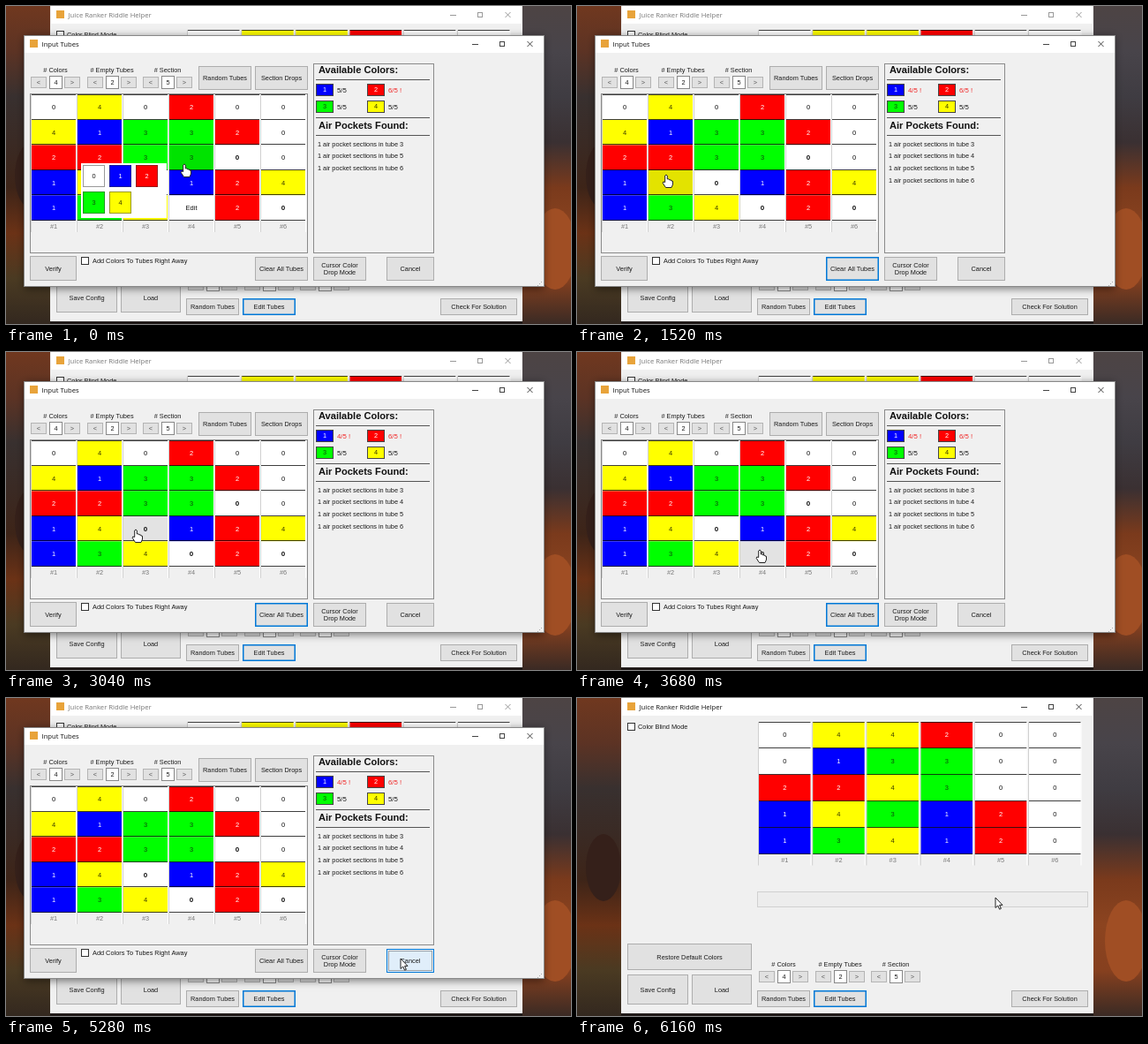
Write an HTML page with a canvas that moves like this. It is 640x360 px and loops after 6240 ms.

```html
<!DOCTYPE html>
<html lang="en">
<head>
<meta charset="utf-8">
<title>Input Tubes</title>
<style>
html, body { margin: 0; width: 100%; height: 100%; overflow: hidden; background: #201a18; }
canvas { display: block; width: 640px; height: 360px; }
</style>
</head>
<body>
<canvas id="stage" width="640" height="360"></canvas>
<script>
const ctx = document.getElementById('stage').getContext('2d');
const LOOP = 6240, STEP = 80;
const POPUP_CLOSES = 640, EDIT_APPLIED = 720, CANCEL_PRESSED = 5120, DIALOG_CLOSES = 5440;
const UI = '"Liberation Sans", Arial, sans-serif';
const TITLE = '7.7px "Open Sans", "Noto Sans", sans-serif';
const FILL = ['#fff', '#00f', '#f00', '#0f0', '#ff0'];
const INK = ['#111', '#fff', '#fff', '#0b4a0b', '#330'];

// One word per tube, colours from top to bottom
const mainTubes = '00211 41243 43434 23311 00022 00000'.split(' ');
const inputTubes = '04211 41243 03304 23310 02022 00040'.split(' ');
const mainGrid = { x: 206, y: 27, dx: 61.2, w: 58.5, dy: 29.9 };
const inputGrid = { x: 29, y: 100.4, dx: 52, w: 50, dy: 28.5 };

// Pointer stops: time, x, y
const stops = [
  [0, 202, 179], [640, 100, 188], [1840, 101, 192], [2000, 121, 196], [3040, 147, 201],
  [4080, 237, 236], [4400, 511, 277], [4960, 447, 295], [DIALOG_CLOSES, 447, 295], [6160, 474, 226]
];

const ease = k => k * k * (3 - 2 * k);
const inside = ([px, py], x, y, w, h) => px >= x && px < x + w && py >= y && py < y + h;

function pointerAt(t) {
  const i = stops.findIndex(s => s[0] > t);
  if (i < 0) return stops.at(-1).slice(1);
  const [t0, x0, y0] = stops[i - 1], [t1, x1, y1] = stops[i];
  const k = ease((t - t0) / (t1 - t0));
  return [x0 + (x1 - x0) * k, y0 + (y1 - y0) * k];
}

function rect(x, y, w, h, color) {
  ctx.fillStyle = color;
  ctx.fillRect(x, y, w, h);
}

function frame(x, y, w, h, color, width = 1) {
  ctx.strokeStyle = color;
  ctx.lineWidth = width;
  ctx.strokeRect(x + width / 2, y + width / 2, w - width, h - width);
}

function dotted(x, y, w, h, color) {
  ctx.setLineDash([1, 1]);
  frame(x, y, w, h, color);
  ctx.setLineDash([]);
}

function text(str, x, y, { color = '#1a1a1a', align = 'left', font = '7.35px ' + UI } = {}) {
  ctx.font = font;
  ctx.fillStyle = color;
  ctx.textAlign = align;
  ctx.textBaseline = 'middle';
  ctx.fillText(str, x, y);
}

function button(label, x, y, w, h, state = '') {
  rect(x, y, w, h, state === 'hot' ? '#e0eefa' : '#e1e1e1');
  frame(x, y, w, h, state ? '#0078d7' : '#adadad', state === 'focus' ? 1.5 : 1);
  const lines = label.split('\n');
  lines.forEach((line, i) =>
    text(line, x + w / 2, y + h / 2 + 0.5 + (i - (lines.length - 1) / 2) * 8.5, { align: 'center' }));
}

function spinner(label, value, x, y) {
  text(label, x + 28, y - 7, { align: 'center' });
  for (const [sign, sx] of [['<', x], ['>', x + 38]]) {
    rect(sx, y, 18, 13, '#e1e1e1');
    frame(sx, y, 18, 13, '#b4b4b4');
    text(sign, sx + 9, y + 7, { align: 'center', color: '#555' });
  }
  rect(x + 21, y - 1, 15, 15, '#fff');
  frame(x + 21, y - 1, 15, 15, '#888');
  text(value, x + 28.5, y + 7, { align: 'center' });
}

function spinners(x, y) {
  ['# Colors', '# Empty Tubes', '# Section'].forEach((label, i) =>
    spinner(label, '425'[i], x + Math.round(i * 63.6), y));
}

function checkbox(label, x, y, gap) {
  rect(x, y, 9, 9, '#fff');
  frame(x, y, 9, 9, '#333');
  text(label, x + gap, y + 5);
}

function titleBar(label, x, y, w, active) {
  rect(x, y, w, 20, '#fff');
  rect(x + 6, y + 5, 9, 9, '#e8a33a');
  text(label, x + 19.5, y + 10.5, { font: TITLE, color: active ? '#111' : '#777' });
  const color = active ? '#444' : '#999', cy = y + 10, right = x + w;
  rect(right - 81, cy, 7, 1, color);
  frame(right - 50, cy - 3, 6, 6, color);
  ctx.beginPath();
  for (const d of [-3, 3]) {
    ctx.moveTo(right - 15.5 - d, cy - 3);
    ctx.lineTo(right - 15.5 + d, cy + 3);
  }
  ctx.stroke();
}

function swatch(d, x, y, w, h, { hot, label = d, font } = {}) {
  rect(x, y, w, h, FILL[d]);
  if (hot) rect(x, y, w, h, 'rgba(0,0,0,.11)');
  text(label, x + w / 2, y + h / 2 + 0.4, { align: 'center', color: INK[d], font });
}

function drawTubes(tubes, g, pointer, editing) {
  const height = 5 * g.dy;
  tubes.forEach((tube, c) => {
    const x = g.x + c * g.dx;
    rect(x - 1, g.y, 1, height + 13, '#d0d0d0');
    rect(x + g.w, g.y, 1, height + 13, '#fff');
    [...tube].forEach((d, r) => {
      const y = g.y + r * g.dy;
      const edit = editing && c === 3 && r === 4;
      const pocket = pointer && !edit && d === '0' && /[1-9]/.test(tube.slice(0, r));
      swatch(d, x, y, g.w, g.dy, {
        hot: pointer && inside(pointer, x, y, g.w, g.dy),
        label: edit ? 'Edit' : d,
        font: (pocket ? 'bold 8px ' : '7.5px ') + UI
      });
    });
    for (let r = 0; r <= 5; r++)
      rect(x, Math.round(g.y + r * g.dy) - (r ? 1 : 0), g.w, 1, 'rgba(0,0,0,.75)');
    text('#' + (c + 1), x + g.w / 2, g.y + height + 7.5, { align: 'center', color: '#777' });
  });
}

function strip(x, w, ...colors) {
  const shade = ctx.createLinearGradient(0, 0, 0, 360);
  colors.forEach((color, i) => shade.addColorStop(i / (colors.length - 1), color));
  rect(x, 0, w, 360, shade);
}

function blob(x, y, rx, ry, color) {
  ctx.beginPath();
  ctx.ellipse(x, y, rx, ry, 0, 0, 7);
  ctx.fillStyle = color;
  ctx.fill();
}

// Soft stand-in for the desktop picture
function drawBackdrop() {
  strip(0, 50, '#70381f', '#5c3324', '#38302f', '#3a2a24', '#3d2418', '#6b3216', '#4a3a22', '#33281f');
  strip(585, 55, '#4d4444', '#48444a', '#3f3c42', '#3a3032', '#7a3a1c', '#8c4420', '#86401f', '#3a2a24');
  blob(30, 192, 20, 38, '#35201a');
  blob(622, 275, 24, 46, '#a04e24');
}

function drawMain(active) {
  rect(50, 0, 535, 357, '#f0f0f0');
  titleBar('Juice Ranker Riddle Helper', 51, 0, 533, active);
  checkbox('Color Blind Mode', 57, 28, 12);
  drawTubes(mainTubes, mainGrid);
  rect(204, 219, 375, 18, '#ededed');
  frame(204, 219, 375, 18, '#d0d0d0');
  button('Restore Default Colors', 57, 278, 141, 30);
  button('Save Config', 57, 313, 69, 34);
  button('Load', 130, 313, 68, 34);
  spinners(206, 309);
  button('Random Tubes', 204, 331, 60, 19);
  button('Edit Tubes', 268, 331, 60, 19, 'focus');
  button('Check For Solution', 492, 331, 87, 19);
}

function drawInfo(applied) {
  const heading = { font: 'bold 11.1px ' + UI, color: '#111' };
  frame(348, 65, 137, 215, '#8a8a8a');
  text('Available Colors:', 354, 72.5, heading);
  text('Air Pockets Found:', 354, 135.5, heading);
  for (const y of [83, 126, 146]) rect(351, y, 129, 1, '#555');

  const counts = [applied ? '4/5 !' : '5/5', '6/5 !', '5/5', '5/5'];
  counts.forEach((count, i) => {
    const x = 351 + (i % 2) * 58, y = 88 + (i >> 1) * 19;
    swatch(i + 1, x, y, 20, 14);
    frame(x, y, 20, 14, '#444');
    text(count, x + 24, y + 7.5, {
      color: count.includes('!') ? '#f02828' : '#1a1a1a', font: '7.8px ' + UI
    });
  });

  (applied ? [3, 4, 5, 6] : [3, 5, 6]).forEach((n, i) =>
    text(`1 air pocket sections in tube ${n}`, 353, 156.5 + i * 13.7));
}

function drawPopup(pointer) {
  rect(85, 178, 97, 62, '#fff');
  for (let d = 0; d < 5; d++) {
    const x = 87 + (d % 3) * 30, y = 180 + Math.floor(d / 3) * 30;
    swatch(d, x, y, 25, 25, { hot: inside(pointer, x, y, 25, 25) });
    dotted(x, y, 25, 25, '#333');
  }
}

function drawDialog(t, pointer) {
  const applied = t >= EDIT_APPLIED, popup = t < POPUP_CLOSES;
  ctx.save();
  ctx.shadowColor = 'rgba(0,0,0,.5)';
  ctx.shadowBlur = 9;
  ctx.shadowOffsetY = 2;
  rect(21, 33, 588, 285, '#f0f0f0');
  ctx.restore();
  titleBar('Input Tubes', 21, 33, 588, true);
  frame(20, 33, 590, 285, '#888');
  for (let i = 0; i < 3; i++) rect(606 - i * 2, 312 + i * 2, 1, 1, '#aaa');

  spinners(28, 80);
  button('Random Tubes', 218, 68, 60, 27);
  button('Section Drops', 282, 68, 60, 27);
  frame(27, 99, 315, 181, '#8a8a8a');
  const overPopup = popup && inside(pointer, 85, 178, 97, 62);
  drawTubes(inputTubes, inputGrid, overPopup ? [-1, -1] : pointer, !applied);
  drawInfo(applied);

  button('Verify', 27, 283, 53, 28);
  checkbox('Add Colors To Tubes Right Away', 85, 284, 13);
  button('Clear All Tubes', 282, 284, 60, 27, applied && t < CANCEL_PRESSED ? 'focus' : '');
  button('Cursor Color\nDrop Mode', 348, 284, 60, 27);
  button('Cancel', 431, 284, 54, 27, inside(pointer, 431, 284, 54, 27) ? 'hot' : '');
  if (t >= CANCEL_PRESSED) dotted(433, 286, 50, 23, '#555');
  if (popup) drawPopup(pointer);
}

const HAND = new Path2D('M-1.3 8.5V1Q0-1 1.3 1V5Q3 4 3.7 6Q5.5 5 6 7Q7.5 6.5 7.5 8V11L6 14.5H-.5L-3.8 9.5Q-4 7-1.3 8.5Z');
const ARROW = new Path2D('M0 0V11.5L2.7 9L4.6 13.2L6.4 12.4L4.6 8.4H8Z');

function drawPointer([x, y], shape) {
  ctx.save();
  ctx.translate(Math.round(x), Math.round(y));
  ctx.lineWidth = 1;
  ctx.lineJoin = 'round';
  ctx.strokeStyle = '#222';
  ctx.fillStyle = '#fff';
  ctx.fill(shape);
  ctx.stroke(shape);
  ctx.restore();
}

function render(now) {
  const t = Math.floor((now % LOOP) / STEP) * STEP;
  const pointer = pointerAt(t), open = t < DIALOG_CLOSES;
  drawBackdrop();
  drawMain(!open);
  if (open) drawDialog(t, pointer);
  drawPointer(pointer, open && inside(pointer, 28, 100, 313, 143) ? HAND : ARROW);
}

const start = performance.now();
function tick() {
  render(performance.now() - start);
  requestAnimationFrame(tick);
}
tick();
</script>
</body>
</html>
```
